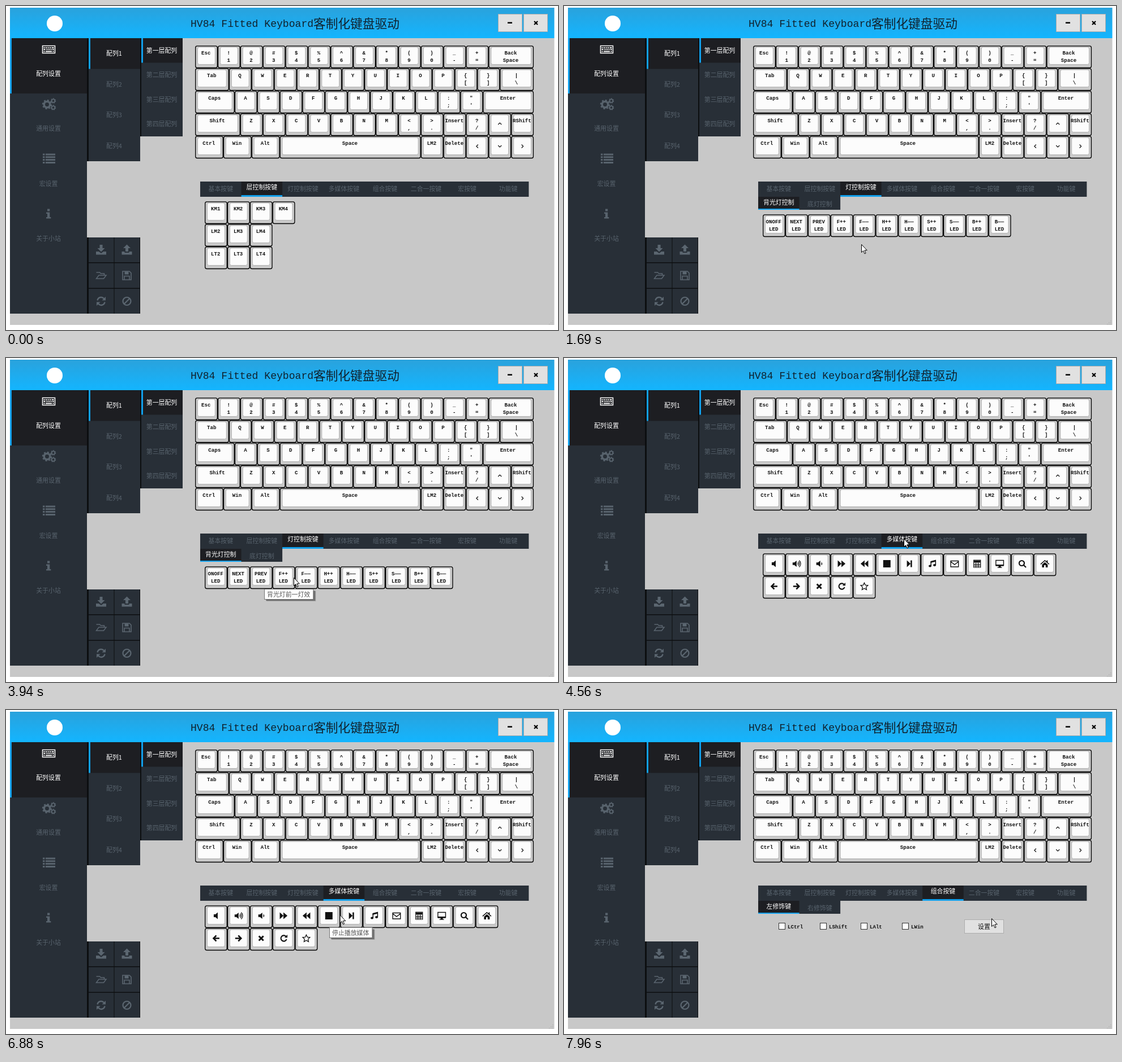
An HTML page with a canvas for the animation above (8 s loop, 975 px wide and 574 px high).

```html
<!DOCTYPE html>
<html lang="zh">
<head>
<meta charset="utf-8">
<title>键盘驱动</title>
<style>
html, body { margin: 0; width: 100%; height: 100%; overflow: hidden; background: #fff; }
canvas { display: block; }
</style>
</head>
<body>
<canvas id="stage" width="975" height="574"></canvas>
<script>
const LOOP = 8000, TICK = 77.2, UNIT = 39.87;
const CJK = '"Noto Sans CJK SC", "Noto Sans CJK", sans-serif';
const MONO = '"Liberation Mono", monospace';
const DARK = '#282f37', ACTIVE = '#1d1e22', BLUE = '#11a0ec', DIM = '#58636d', GRAY = '#c8c8c8';

const stage = document.getElementById('stage');
const backdrop = document.createElement('canvas');
backdrop.width = stage.width;
backdrop.height = stage.height;
let g = backdrop.getContext('2d');

// name: [filled path, stroked path, line width], centred on 0,0
const ICONS = {
  up: ['', 'M-3 1.5l3-3 3 3', 1.2],
  down: ['', 'M-3-1.5l3 3 3-3', 1.2],
  prev: ['', 'M1.5-3l-3 3 3 3', 1.2],
  next: ['', 'M-1.5-3l3 3-3 3', 1.2],
  mute: ['M-4-2.5h3l4-3.5v12l-4-3.5h-3z'],
  loud: ['M-7-2.2h3l4-3.3v11l-4-3.3h-3z', 'M2-2a3 3 0 0 1 0 4M3.3-4a5.5 5.5 0 0 1 0 8M4.6-6a8 8 0 0 1 0 12', 1.2],
  quiet: ['M-5-2.2h3l4-3.3v11l-4-3.3h-3z', 'M4-2a3 3 0 0 1 0 4', 1.3],
  forward: ['M-7-6l6.5 6-6.5 6zM-.5-6l7 6-7 6z'],
  rewind: ['M7-6l-6.5 6 6.5 6zM.5-6l-7 6 7 6z'],
  stop: ['M-6.5-6.5h13v13h-13z'],
  skip: ['M-4.5-6l6.5 6-6.5 6zM2-6h2.5v12h-2.5z'],
  music: ['M-6 4a2.5 2 0 1 1 5 0a2.5 2 0 1 1-5 0M2 2.5a2.5 2 0 1 1 5 0a2.5 2 0 1 1-5 0M-2.5-4.5l9.5-2.5v3l-9.5 2.5z', 'M-1.8 4v-8M6.3 2.5v-8', 1.5],
  mail: ['', 'M-6.8-5h13.6v10.5h-13.6zM-6.5-3.5l6.5 5 6.5-5', 1.4],
  calc: ['M-6-6h12v4h-12z', 'M-6-6.5h12v13h-12zM-6 1.2h12M-6 4h12M-2.2-2v8M1.8-2v8', 1.2],
  screen: ['M-7 1.5h14v2.5h-14zM-2 4h4v2h2v1.2h-8v-1.2h2z', 'M-6.8-6h13.6v9h-13.6z', 1.4],
  search: ['', 'M3.5-1a4.5 4.5 0 1 1-9 0a4.5 4.5 0 1 1 9 0M2.5 2.5l4 4', 2.2],
  home: ['M-8 .3l8-7 3 2.6v-2h2v3.8l3 2.6-1 1.1-7-6.1-7 6.1zM-5 1.6l5-4.3 5 4.3v5h-3.6v-4h-2.8v4h-3.6z'],
  west: ['', 'M6 0h-11M.5-5l-5 5 5 5', 2.5],
  east: ['', 'M-6 0h11M-.5-5l5 5-5 5', 2.5],
  cross: ['', 'M-4-4l8 8M4-4l-8 8', 3],
  reload: ['M6.5-6.5v5.3h-5.3z', 'M4-3.3a5.1 5.1 0 1 0 1 4.8', 2.1],
  star: ['', 'M0-6.2l1.9 4 4.5.5-3.3 3.1.9 4.5L0 3.7l-4 2.2.9-4.5-3.3-3.1 4.5-.5z', 1.3],
  keyboard: ['M-9-4h2v2h-2zM-5.5-4h2v2h-2zM-2-4h2v2h-2zM1.5-4h2v2h-2zM5-4h4v2h-4zM-9-1h3v2h-3zM-4-1h2v2h-2zM-.5-1h2v2h-2zM3-1h2v2h-2zM6.5-1h2.5v2h-2.5zM-9 2.5h2v2h-2zM-5.5 2.5h11v2h-11zM7 2.5h2v2h-2z', 'M-11-6.5h22v13h-22z', 1.5],
  list: ['M-11-8.5h3.5v3h-3.5zM-6-8.5h17v3h-17zM-11-3.7h3.5v3h-3.5zM-6-3.7h17v3h-17zM-11 1.1h3.5v3h-3.5zM-6 1.1h17v3h-17zM-11 5.9h3.5v3h-3.5zM-6 5.9h17v3h-17z'],
  info: ['M-2-8.5h4.3v4h-4.3zM-4-2.5h6.3v8.5h2v2.5h-8.3v-2.5h2v-6h-2z'],
  load: ['M-2.5-9h5v6h4l-6.5 6.5-6.5-6.5h4zM-9 3h5l4 3 4-3h5v5.5h-18z'],
  unload: ['M-2.5 3h5v-6h4l-6.5-6.5-6.5 6.5h4zM-9 3h5v2h8v-2h5v5.5h-18z'],
  folder: ['', 'M-8.5-5.5h6l2 2h6v3M-4-.5h13l-4.5 6h-13z', 1.5],
  disk: ['M-4-7h7v5h-7z', 'M-7.5-7.5h12l3 3v12h-15zM-4.5 7v-6h9v6', 1.6],
  sync: ['M8-8v6.5h-6.5zM-8 8v-6.5h6.5z', 'M-6.5-1.5a6.5 6.5 0 0 1 11.5-3M6.5 1.5a6.5 6.5 0 0 1-11.5 3', 2.4],
  ban: ['', 'M7 0a7 7 0 1 1-14 0a7 7 0 1 1 14 0M5-5l-10 10', 2.2]
};

const BOARD = [
  'Esc !¦1 @¦2 #¦3 $¦4 %¦5 ^¦6 &¦7 *¦8 (¦9 )¦0 _¦- +¦= Back¦Space~2',
  'Tab~1.5 Q W E R T Y U I O P {¦[ }¦] |¦\\~1.5',
  "Caps~1.75 A S D F G H J K L :¦; \"¦' Enter~2.25",
  'Shift~2 Z X C V B N M <¦, >¦. Insert ?¦/ up RShift',
  'Ctrl~1.25 Win~1.25 Alt~1.25 Space~6.25 LM2 Delete prev down next'
];
const LAYERS = ['KM1 KM2 KM3 KM4', 'LM2 LM3 LM4', 'LT2 LT3 LT4'];
const LIGHTS = ['ONOFF¦LED NEXT¦LED PREV¦LED F++¦LED F——¦LED H++¦LED H——¦LED S++¦LED S——¦LED B++¦LED B——¦LED'];
const MEDIA = ['mute loud quiet forward rewind stop skip music mail calc screen search home', 'west east cross reload star'];
const TABS = ['基本按键', '层控制按键', '灯控制按键', '多媒体按键', '组合按键', '二合一按键', '宏按键', '功能键'];
const TAB_X = 343, TAB_Y = 311, TAB_W = 72.55;

// pointer: tick, x, y
const PATH = [
  [1, 791, 513], [4, 640, 400], [8, 485, 303], [11, 502, 315], [12, 514, 320], [15, 514, 320],
  [18, 600, 390], [19, 628, 415], [20, 590, 430], [22, 525, 422], [24, 480, 402], [26, 455, 396],
  [50, 455, 396], [51, 508, 389], [54, 590, 330], [56, 600, 320], [60, 600, 320],
  [63, 645, 390], [66, 673, 455], [70, 570, 371], [88, 570, 371], [94, 687, 322],
  [97, 687, 322], [103, 755, 369]
];

function box(x, y, w, h, fill) {
  g.fillStyle = fill;
  g.fillRect(x, y, w, h);
}

function frame(x, y, w, h, fill, edge) {
  box(x, y, w, h, edge);
  box(x + 1, y + 1, w - 2, h - 2, fill);
}

function pill(x, y, w, h, fill, edge, line) {
  g.beginPath();
  g.roundRect(x, y, w, h, 3);
  g.fillStyle = fill;
  g.fill();
  g.strokeStyle = edge;
  g.lineWidth = line;
  g.stroke();
}

function han(s, x, cy, color, size = 10.9, align = 'center') {
  g.font = `${size}px ${CJK}`;
  g.textAlign = align;
  g.fillStyle = color;
  g.fillText(s, x, cy + size * 0.38);
}

function latin(s, x, base, align = 'center') {
  g.font = `bold 9.1px ${MONO}`;
  g.textAlign = align;
  g.fillStyle = '#111';
  g.fillText(s, x, base);
}

function icon(name, x, y, color) {
  const [solid, line, width] = ICONS[name];
  g.save();
  g.translate(x, y);
  g.fillStyle = g.strokeStyle = color;
  if (solid) g.fill(new Path2D(solid));
  if (line) {
    g.lineWidth = width;
    g.stroke(new Path2D(line));
  }
  g.restore();
}

function gear(x, y, r, teeth) {
  const ring = (radius, width, dash) => {
    g.beginPath();
    g.arc(x, y, radius, 0, Math.PI * 2);
    g.lineWidth = width;
    g.setLineDash(dash);
    g.stroke();
  };
  g.strokeStyle = DIM;
  ring(r * 0.62, r * 0.42, []);
  const d = Math.PI * r * 0.88 / teeth;
  ring(r * 0.88, r * 0.3, [d, d]);
  g.setLineDash([]);
}

function key(x, y, w, label) {
  pill(x + 0.7, y + 0.9, w - 1.3, 38.6, '#cacaca', '#000', 1.3);
  pill(x + 4.5, y + 3, w - 9, 30.5, '#fcfcfc', '#b2b2b2', 1);
  if (ICONS[label]) icon(label, x + w / 2, y + 18.5, '#111');
  else label.split('¦').forEach((s, i) => latin(s, x + w / 2 - 0.7, y + 16 + i * 12.8));
}

function keys(rows, x0, y0) {
  rows.forEach((row, r) => {
    let x = x0;
    for (const token of row.split(' ')) {
      const [label, units = 1] = token.split('~');
      key(x, y0 + r * 40, units * UNIT, label);
      x += units * UNIT;
    }
  });
}

function tabs(names, y, h, line, lit) {
  box(TAB_X, y, names.length * TAB_W, h, DARK);
  names.forEach((s, i) => {
    const x = TAB_X + i * TAB_W, on = lit.includes(i);
    if (on) {
      box(x, y, TAB_W, h, ACTIVE);
      box(x, y + h - line, TAB_W, line, BLUE);
    }
    han(s, x + TAB_W / 2, y + (on ? 10.3 : 13), on ? '#fff' : DIM);
  });
}

function menu(names, x, w, h) {
  box(x, 57, w, names.length * h, DARK);
  box(x, 57, w, h, ACTIVE);
  box(x, 57, 3, h, BLUE);
  names.forEach((s, i) => han(s, x + w / 2 - 0.5, 57 + h * (i + 0.5), i ? DIM : '#fff'));
}

function drawBackdrop() {
  box(0, 0, 975, 574, '#fff');
  box(7, 57, 961.5, 508, GRAY);
  const sky = g.createLinearGradient(0, 3, 0, 57);
  sky.addColorStop(0, '#2aa2dc');
  sky.addColorStop(1, '#13b5ff');
  box(7, 3, 961.5, 54, sky);

  g.fillStyle = '#fff';
  g.beginPath();
  g.arc(86, 31, 14, 0, Math.PI * 2);
  g.fill();
  g.font = `18.1px ${MONO}`;
  g.textAlign = 'left';
  g.fillStyle = '#10222e';
  g.fillText('HV84 Fitted Keyboard', 326, 37);
  han('客制化键盘驱动', 543, 30.5, '#10222e', 21.7, 'left');

  frame(869, 14, 43, 32, '#e1e1e1', '#adadad');
  frame(914, 14, 43, 32, '#e1e1e1', '#adadad');
  box(886, 28.5, 8, 2.5, '#000');
  g.save();
  g.translate(936, 30);
  g.scale(0.75, 0.75);
  icon('cross', 0, 0, '#000');
  g.restore();

  box(7, 57, 136, 488, DARK);
  box(7, 57, 136, 98, ACTIVE);
  box(7, 57, 3, 98, BLUE);
  icon('keyboard', 75.5, 77, '#fff');
  gear(72.5, 174.5, 8.5, 8);
  gear(83.5, 168, 4.6, 7);
  gear(83.5, 180, 4.6, 7);
  icon('list', 76, 270, DIM);
  icon('info', 75, 368, DIM);
  ['配列设置', '通用设置', '宏设置', '关于小站'].forEach((s, i) =>
    han(s, 75, 119.5 + i * 97.5, i ? DIM : '#fff'));

  box(143, 57, 3, 218, '#0c0e10');
  box(237, 57, 2, 174, '#0c0e10');
  menu(['配列1', '配列2', '配列3', '配列4'], 146, 91, 54.5);
  menu(['第一层配列', '第二层配列', '第三层配列', '第四层配列'], 239, 73, 43.5);

  box(143, 410, 94, 135, '#0c0e10');
  ['load', 'unload', 'folder', 'disk', 'sync', 'ban'].forEach((name, i) => {
    const x = 146 + (i % 2) * 45.5, y = 410 + Math.floor(i / 2) * 45.5;
    box(x, y, 44.5, 44, DARK);
    icon(name, x + 22, y + 22, '#5b6670');
  });

  for (let i = 0; i < 3; i++)
    for (let j = 0; j <= i; j++) box(965 - j * 3, 557 + i * 3, 1.5, 1.5, '#b2b2b2');
  keys(BOARD, 334, 70);
}

function tooltip(s, x, y, alpha) {
  g.save();
  g.globalAlpha = alpha;
  g.font = `10.9px ${CJK}`;
  const w = g.measureText(s).width + 11;
  box(x + 4, y + 4, w, 18, 'rgba(0,0,0,.2)');
  box(x + 3, y + 3, w, 18, 'rgba(0,0,0,.3)');
  frame(x, y, w, 19, '#fff', '#767676');
  han(s, x + 5, y + 9.7, '#575757', 10.9, 'left');
  g.restore();
}

function pointerAt(n) {
  const i = PATH.findIndex(p => p[0] > n);
  if (i < 0) return PATH[PATH.length - 1].slice(1);
  const [a, ax, ay] = PATH[i - 1], [b, bx, by] = PATH[i];
  const k = (n - a) / (b - a);
  return [ax + (bx - ax) * k, ay + (by - ay) * k];
}

function drawPointer(x, y) {
  g.save();
  g.translate(x + 0.5, y + 0.5);
  const arrow = new Path2D('M0 0v14l3.2-2.9 2.3 5.3 2.1-.9-2.2-5.2h4.4z');
  g.fillStyle = '#fff';
  g.fill(arrow);
  g.strokeStyle = '#000';
  g.lineWidth = 1;
  g.stroke(arrow);
  g.restore();
}

function modifiers() {
  ['LCtrl', 'LShift', 'LAlt', 'LWin'].forEach((s, i) => {
    const x = Math.round(379 + i * 72.6);
    frame(x, 377, 12, 12, '#fff', '#333');
    latin(s, x + 16, 387, 'left');
  });
  frame(707, 371, 70, 25, '#e1e1e1', '#adadad');
  han('设置', 742, 383.5, '#111');
}

function draw(t) {
  const n = Math.floor(t / TICK + 0.3);
  const tab = n < 14 ? 1 : n < 59 ? 2 : n < 97 ? 3 : 4;
  const lit = [tab];
  const spot = n > 0 ? pointerAt(n) : null;
  if (spot && spot[1] >= TAB_Y && spot[1] < TAB_Y + 27)
    lit.push(Math.floor((spot[0] - TAB_X) / TAB_W));

  g.drawImage(backdrop, 0, 0);
  tabs(TABS, TAB_Y, 27, 3, lit);
  if (tab === 1) keys(LAYERS, 351, 346);
  if (tab === 2) {
    tabs(['背光灯控制', '底灯控制'], 338, 23, 2, [0]);
    keys(LIGHTS, 351, 369);
  }
  if (tab === 3) keys(MEDIA, 351, 346);
  if (tab === 4) {
    tabs(['左修饰键', '右修饰键'], 338, 23, 2, [0]);
    modifiers();
  }

  if (n >= 35 && n < 53) tooltip('背光灯前一灯效', 456, 409, n === 35 ? 0.5 : 1);
  if (n >= 80 && n < 91) tooltip('停止播放媒体', 571, 385, 1);
  if (spot) drawPointer(...spot);
}

drawBackdrop();
g = stage.getContext('2d');
const start = performance.now();
(function loop() {
  draw((performance.now() - start) % LOOP);
  requestAnimationFrame(loop);
})();
</script>
</body>
</html>
```
